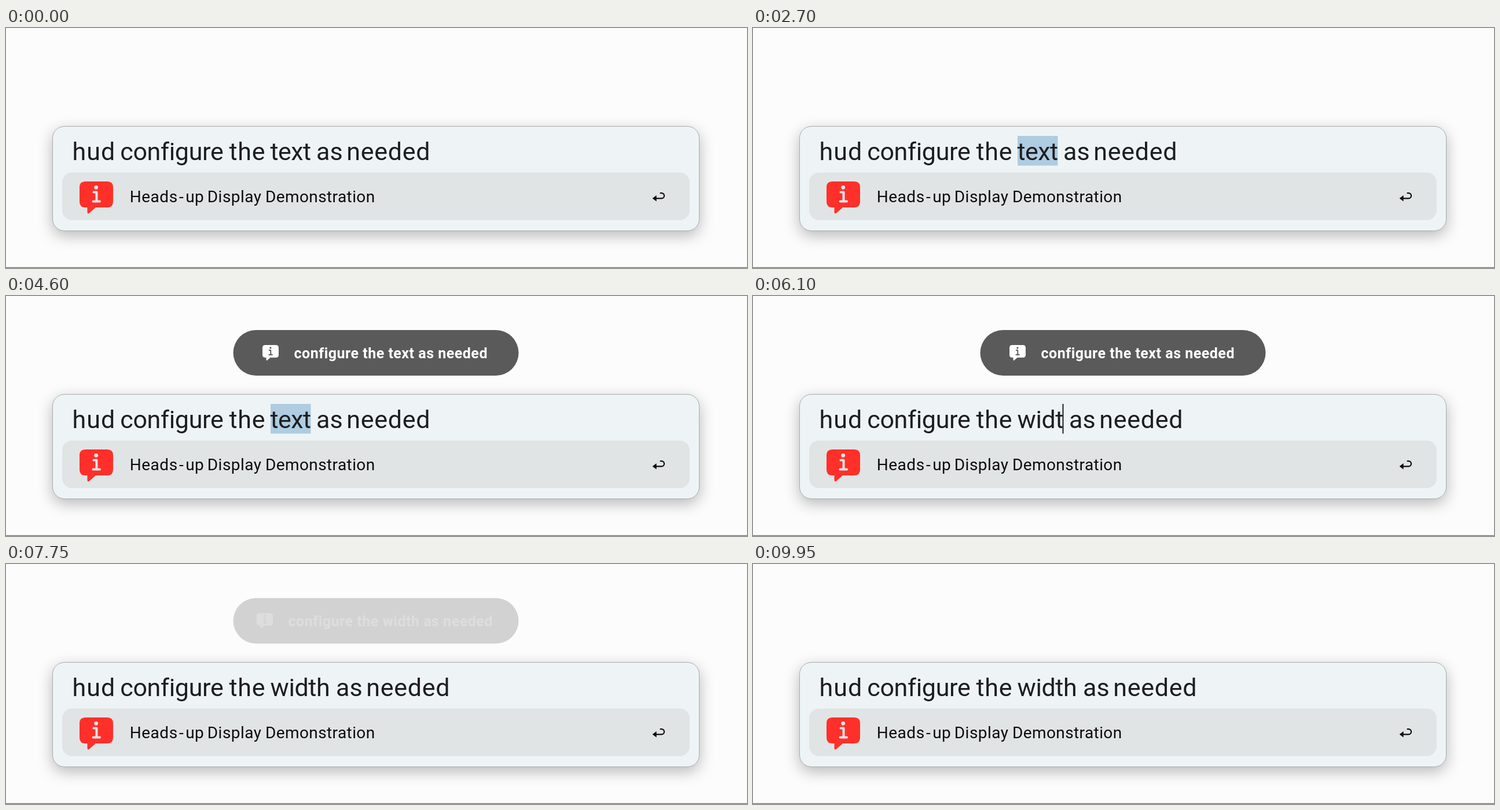
Recreate the animation shown at these times as an HTML page. Size 1280 by 416 pixels, loop 10 s.

```html
<!DOCTYPE html>
<html lang="en">
<head>
<meta charset="utf-8">
<title>Heads-up Display Demonstration</title>
<style>
  html, body { margin: 0; width: 100%; height: 100%; overflow: hidden; background: #fcfcfc; }
  svg { position: absolute; inset: 0; width: 100%; height: 100%; display: block; }
  .panel {
    position: absolute; left: 80px; top: 170px; width: 1118px; height: 182px;
    box-sizing: border-box; border: 1px solid #a9acac; border-radius: 21px;
    background: #eef4f5; box-shadow: 0 8px 26px rgba(0, 0, 0, .27);
  }
  text { font-family: Roboto, Inter, "Liberation Sans", sans-serif; white-space: pre; }
  .query { font-size: 43px; fill: #1d1e20; }
  .item { font-size: 28px; fill: #0c0c0c; }
  .note { font-size: 25px; font-weight: 700; letter-spacing: .5px; fill: #fff; }
</style>
</head>
<body>
<div class="panel"></div>
<svg viewBox="0 0 1280 416">
  <defs>
    <mask id="cut" maskUnits="userSpaceOnUse" x="0" y="0" width="60" height="60">
      <rect width="60" height="60" fill="#fff"/>
      <circle cx="28.7" cy="10.3" r="3.4"/>
      <path d="M24.5 18.5H29.5V34M23.5 34.5H35" fill="none" stroke="#000" stroke-width="4"
        stroke-linecap="round" stroke-linejoin="round"/>
    </mask>
    <path id="bubble" mask="url(#cut)" d="M10 0H48Q58 0 58 10V35Q58 45 48 45H28L17.5 54.3Q13.5 57.5 13.5 52.5V45H10Q0 45 0 35V10Q0 0 10 0Z"/>
  </defs>

  <rect y="414.6" width="1280" height="1.4" fill="#7c7c7c"/>
  <rect x="97" y="250.5" width="1084" height="82.5" rx="17" fill="#e1e4e5"/>
  <use href="#bubble" x="0" y="0" transform="translate(127 266)" fill="#ff3029"/>
  <g id="item" class="item"></g>
  <path d="M1120 295.3H1132.4a4.6 4.6 0 0 0 0-9.2H1130.5" fill="none" stroke="#0c0c0c" stroke-width="2.2" stroke-linecap="round"/>
  <path d="M1116.6 295.3L1123.6 290V300.6Z" fill="#0c0c0c"/>

  <rect id="mark" x="457" y="187" width="69.5" height="51.5" fill="#afcce1"/>
  <g id="head" class="query"></g>
  <text id="word" class="query" x="456.5" y="229"></text>
  <g id="tail" class="query"></g>
  <rect id="caret" y="187" width="2" height="51.5" fill="#1d1e20"/>

  <g id="hud">
    <rect id="pill" x="392.5" y="59" width="493" height="79" rx="39.5" fill="#5a5a5a"/>
    <g id="body">
      <use href="#bubble" transform="translate(443 85) scale(.483)" fill="#fff"/>
      <text id="note" class="note" x="497.5" y="107.5"></text>
    </g>
  </g>
</svg>
<script>
  const LOOP = 10000, STEP = 50;
  const $ = id => document.getElementById(id);

  // Each word: text, x, letter spacing
  function addWords(id, y, words) {
    for (const [str, x, gap] of words) {
      const el = document.createElementNS("http://www.w3.org/2000/svg", "text");
      el.textContent = str;
      el.setAttribute("x", x);
      el.setAttribute("y", y);
      el.style.letterSpacing = gap + "px";
      $(id).append(el);
    }
  }
  addWords("head", 229, [["hud", 114.5, 1], ["configure", 197.2, -.3], ["the", 385.5, .7]]);
  addWords("tail", 229, [["as", 536, 0], ["needed", 588.3, .7]]);
  addWords("item", 301.5, [["Heads", 213.8, .5], ["-", 299, 0], ["up", 310.3, .3],
    ["Display", 347.8, .45], ["Demonstration", 448, .4]]);

  const SELECT = 1750, TYPE = 5600;
  // Start time, typed word, shift of the words after it
  const keys = [[0, "text", 0], [TYPE, "w", -38], [5800, "wi", -28],
    [5950, "wid", -5], [6050, "widt", 10], [6250, "width", 34]];

  const ease = v => {
    const p = Math.min(1, Math.max(0, v));
    return p * p * (3 - 2 * p);
  };
  const fade = (t, start) => ease((t - start) / 150) * (1 - ease((t - start - 1850) / 250));
  const show = (el, on) => el.setAttribute("visibility", on ? "visible" : "hidden");

  function caretOn(t) {
    if (t < SELECT) return (t + 750) % 1000 < 500;
    if (t < TYPE) return false;
    return t < 6500 || t % 1000 < 500;
  }

  function draw(t) {
    const [, word, shift] = keys.filter(k => k[0] <= t).pop();
    $("word").textContent = word;
    $("word").style.letterSpacing = word === "text" ? "-.6px" : "-.4px";
    $("tail").setAttribute("transform", `translate(${shift})`);
    $("caret").setAttribute("x", t < TYPE ? 527 : 524.5 + shift);
    show($("caret"), caretOn(t));
    show($("mark"), t >= SELECT && t < TYPE);

    const second = t >= 7000;
    const alpha = second ? fade(t, 7700) : fade(t, 4450);
    $("note").textContent = `configure the ${second ? "width" : "text"} as needed`;
    $("body").setAttribute("transform", `translate(${second ? -10 : 0})`);
    $("pill").setAttribute("opacity", alpha);
    $("body").setAttribute("opacity", alpha);
    show($("hud"), alpha > 0);
  }

  const begin = performance.now();
  function tick() {
    const t = (performance.now() - begin) % LOOP;
    draw(Math.floor(t / STEP) * STEP);
    requestAnimationFrame(tick);
  }
  tick();
</script>
</body>
</html>
```
